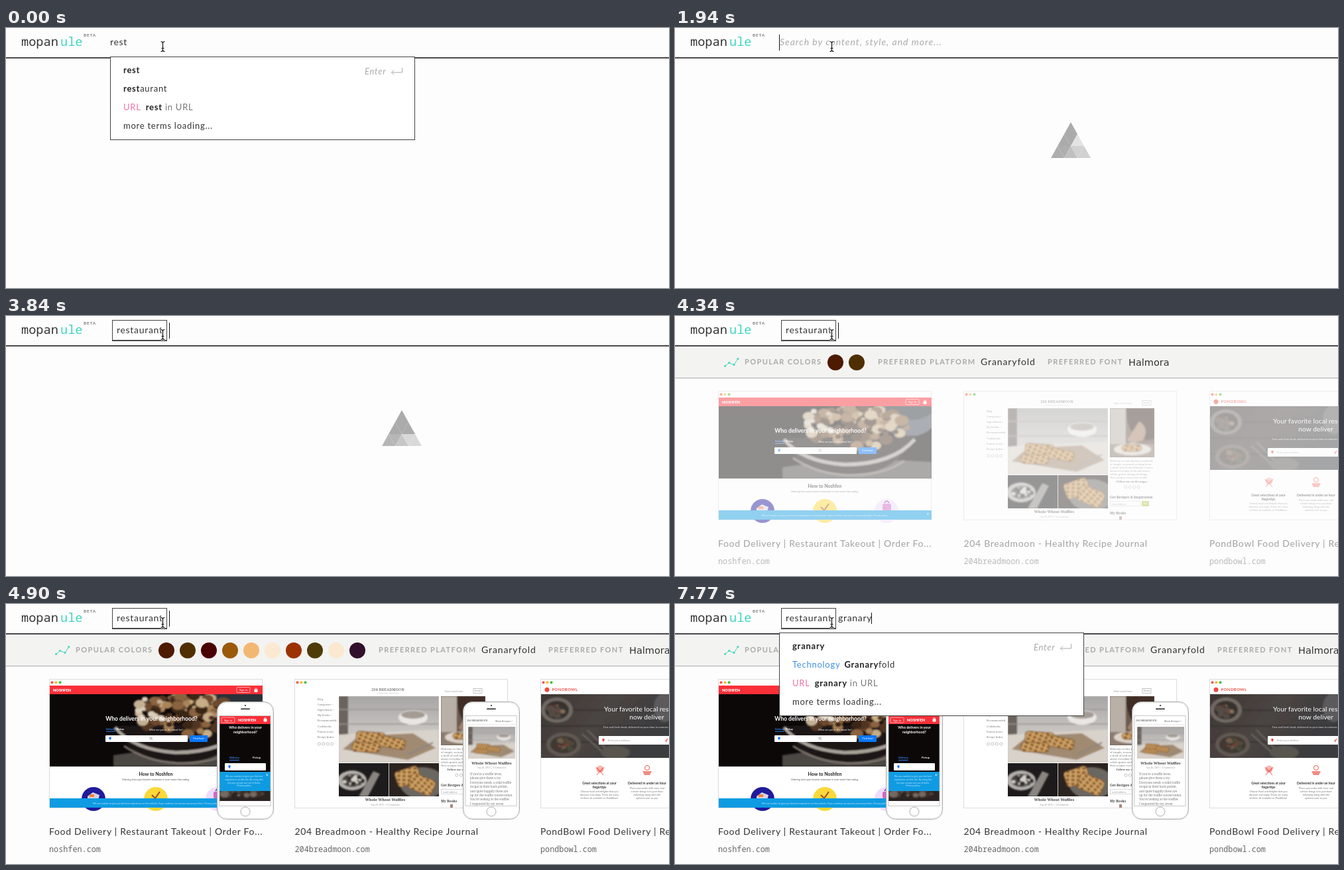
Recreate the animation shown at these times as an HTML page. Size 1000 by 392 pixels, loop 8000 ms.

```html
<!DOCTYPE html>
<html lang="en">
<head>
<meta charset="utf-8">
<title>Design search</title>
<style>
html, body { margin: 0; width: 100%; height: 100%; overflow: hidden; background: #fdfdfd; }
#stage { display: block; width: 1000px; height: 392px; }
</style>
</head>
<body>
<svg id="stage" viewBox="0 0 1000 392" font-family="Lato, sans-serif"></svg>
<script>
const LOOP = 8000;
const INK = '#333', GREY = '#aaa', TEAL = '#3fd6bf', PINK = '#f273a6', BLUE = '#3d8fe8';
const BRAND = 'Granaryfold', TYPED = 'granary';
const SERIF = 'font-family="Noto Serif, serif"';
const BOLD = 'font-weight="700"', MID = 'text-anchor="middle"';
const $ = id => document.getElementById(id);
const clamp = v => Math.max(0, Math.min(1, v));

// Drawing helpers
const rect = (x, y, w, h, fill, more = '') =>
  `<rect x="${x}" y="${y}" width="${w}" height="${h}" fill="${fill}" ${more}/>`;
const disc = (x, y, r, fill, more = '') => `<circle cx="${x}" cy="${y}" r="${r}" fill="${fill}" ${more}/>`;
const oval = (x, y, rx, ry, fill, more = '') =>
  `<ellipse cx="${x}" cy="${y}" rx="${rx}" ry="${ry}" fill="${fill}" ${more}/>`;
const shape = (d, fill, more = '') => `<path d="${d}" fill="${fill}" ${more}/>`;
const line = (d, color, w = 1, more = '') =>
  `<path d="${d}" fill="none" stroke="${color}" stroke-width="${w}" ${more}/>`;
const text = (x, y, size, fill, str, more = '') =>
  `<text x="${x}" y="${y}" font-size="${size}" fill="${fill}" ${more}>${str}</text>`;
const lines = (x, y, step, size, fill, list, more) =>
  list.map((s, i) => text(x, y + i * step, size, fill, s, more)).join('');
const group = (id, body, more = '') => `<g id="${id}" ${more}>${body}</g>`;
const photo = (x, y, w, h, base, body) =>
  `<svg x="${x}" y="${y}" width="${w}" height="${h}">${rect(0, 0, w, h, base)}<g filter="url(#soft)">${body}</g></svg>`;

let seed = 7;
const rnd = () => (seed = seed * 16807 % 2147483647) / 2147483647;
const blobs = (n, cx, cy, rx, ry, size, colors) => Array.from({ length: n }, () => {
  const a = rnd() * 6.283, d = Math.sqrt(rnd()), s = size * (0.4 + rnd());
  return oval((cx + rx * d * Math.cos(a)).toFixed(1), (cy + ry * d * Math.sin(a)).toFixed(1),
    (s * 1.3).toFixed(1), s.toFixed(1), colors[Math.floor(rnd() * colors.length)]);
}).join('');
const waffle = (x, y, w, h, angle) =>
  rect(x, y, w, h, 'url(#waffle)', `rx="5" stroke="#7d5426" transform="rotate(${angle} ${x + w / 2} ${y + h / 2})"`);

const defs = `<defs>
  <filter id="soft"><feGaussianBlur stdDeviation=".9"/></filter>
  <pattern id="waffle" width="8" height="6" patternUnits="userSpaceOnUse" patternTransform="rotate(20)">
    ${rect(0, 0, 8, 6, '#cfa468')}${rect(1, 1, 5, 3.5, '#8a5a2a')}</pattern>
  <linearGradient id="wall" x2="0" y2="1"><stop stop-color="#a7a5a4"/><stop offset=".5" stop-color="#c6c3c0"/><stop offset="1" stop-color="#d9d3cb"/></linearGradient>
  <linearGradient id="slate" x2="1" y2=".4"><stop stop-color="#3d3633"/><stop offset=".5" stop-color="#4b4542"/><stop offset="1" stop-color="#3b3c40"/></linearGradient>
</defs>`;

// Page header
const wordmark = (x, str, fill) =>
  text(x, 27, 18.6, fill, str, 'font-family="Noto Sans Mono, monospace" font-weight="500"');
const header = rect(0, 44, 1000, 2, '#4b484b') + wordmark(23, 'mopan', INK) + wordmark(82, 'ule', TEAL) +
  text(117, 13, 6.5, '#555', 'BETA', 'letter-spacing=".8"');

// Loader: nine small triangles, each lit in turn around the ring
const ringSlot = [0, 5, 5, 1, 4, 4, 3, 2, 2];
const triangles = () => {
  const out = [];
  for (let row = 0; row < 3; row++) {
    for (let k = 0; k <= row * 2; k++) {
      const x = 597 + (k - row) * 10, top = 142 + row * 18, low = top + 18;
      const d = k % 2 ? `M${x - 10} ${top}h20l-10 18z` : `M${x} ${top}L${x - 10} ${low}h20z`;
      out.push(shape(d, GREY, 'class="tri"'));
    }
  }
  return out.join('');
};

// Trend bar
const dotColors = ['#4e1a00', '#4f2f02', '#4a0000', '#9a5a0a', '#f2b873',
  '#fbe9d2', '#9c3303', '#4f3b08', '#fae8d0', '#33102b'];
const barLabel = (x, s) => text(x, 73, 11, GREY, s, BOLD + ' letter-spacing="1.38"');
const trend = [[75.5, 75.5], [81.5, 70.5], [89, 73.5], [94.8, 64.5]];
const bar = rect(0, 46, 1000, 47, '#f3f3f2') + rect(0, 93, 1000, 1, '#ababab') +
  line('M' + trend.join('L'), TEAL) + trend.map(([x, y]) => disc(x, y, 1.5, TEAL)).join('') +
  barLabel(105, 'POPULAR COLORS') +
  dotColors.map((c, i) => disc(242 + 32 * i, 70, 12, c, 'class="dot"')).join('') +
  group('prefs', barLabel(306, 'PREFERRED PLATFORM') + text(461, 74, 14, INK, BRAND, 'letter-spacing=".9"') +
    barLabel(562, 'PREFERRED FONT') + text(684, 75, 14.5, INK, 'Halmora', 'font-family="DejaVu Sans, sans-serif"'));

// Result cards
const frame = x => rect(x + .5, 113.5, 321, 194, '#fff', 'stroke="#dcdcdc"') +
  ['#f4574f', '#f5b92e', '#3fbf49'].map((c, i) => disc(x + 4.5 + i * 6, 118.3, 2, c)).join('');
const caption = (x, title, site) => text(x, 348, 14, INK, title, 'letter-spacing=".68"') +
  text(x, 374, 11.8, '#666', site, 'font-family="Noto Sans Mono, monospace"');
const phone = (x, screen) =>
  rect(x + .5, 147.5, 85, 177, '#fff', 'rx="14" stroke="#aaa"') +
  rect(x + 2, 149, 82, 174, 'none', 'rx="12.5" stroke="#ddd" stroke-width=".7"') +
  disc(x + 43, 153, 1.1, '#222') + rect(x + 36, 157.5, 14, 1.6, '#222', 'rx=".8"') +
  disc(x + 43, 313, 7, '#fff', 'stroke="#999" stroke-width=".8"') +
  screen + rect(x + 4, 168.5, 77, 136, 'none', 'stroke="#bbb" stroke-width=".8"');
const bag = (x, y) => rect(x - 2.5, y - 1.5, 5, 4.5, '#fff', 'rx="1"') +
  line(`M${x - 1.4} ${y - 1.5}a1.4 1.6 0 0 1 2.8 0`, '#fff', .8);
const signIn = (x, y) => rect(x, y, 20, 8, 'none', 'rx="1.5" stroke="#fff" stroke-width=".6"') +
  text(x + 10, y + 5.6, 4.2, '#fff', 'Sign in', MID);

const stew = shape('M96 92Q200 76 321 84V109H96z', '#4c4642') +
  oval(286, 16, 42, 30, '#48505c') + oval(286, 6, 36, 15, '#2c3138') +
  shape('M100 48Q120 100 190 104Q270 104 296 44z', '#1d1816') +
  blobs(120, 208, 32, 78, 30, 6, ['#4f3420', '#8a6440', '#a9835a', '#3a2618', '#c8ad86', '#6d4a2e']) +
  blobs(14, 150, 26, 26, 22, 5, ['#d9cdb8', '#c4b093']) +
  line('M98 50Q126 84 190 88Q262 88 296 50', '#aaa39c', 5) +
  line('M112 78Q150 104 200 104Q250 104 280 82', '#79716b', 3);
const tabs = (x, y, gap, s) => text(x, y, s, '#2f8cff', 'Delivery', BOLD) +
  text(x + gap, y, s, '#fff', 'Pickup', BOLD) + rect(x, y + 2, s * 3.7, .9, '#2f8cff');
const pin = (x, y, c) => disc(x, y, 1.8, c) + shape(`M${x - 1.6} ${y + .7}h3.2l-1.6 2.8z`, c);

const steps = disc(132, 294, 18, '#1f1b9c') + shape('M123 290l8-6 10 4-3 12h-15z', '#d9d2e0') + rect(126, 287, 7, 4, '#f2813d') +
  disc(226, 294, 18, '#fbd93a') + line('M220 288l5 5 7-10', '#a2472b', 2) +
  disc(319, 294, 18, '#efdcfb') + rect(313, 283, 13, 10, '#cf6ac2', 'rx="2"') + line('M316 282q3-6 7 0', '#7a3b9d', 1.5);

const noshCard = frame(65) + rect(66, 123, 321, 13, '#fa2f38') +
  text(71, 131.8, 5.6, '#fff', 'NOSHFEN', 'font-weight="900"') + signIn(348, 125.5) + bag(377, 130) +
  photo(66, 136, 321, 109, '#0d0808', stew) +
  text(219.5, 175.5, 8.6, '#fff', 'Who delivers in your neighborhood?', BOLD + ' ' + MID) +
  tabs(151, 189.7, 16, 3.6) + text(216, 190.5, 3.8, '#fff', 'What are you in the mood for?') +
  rect(150, 198, 124, 10, '#fff', 'rx="1"') + pin(157, 202, '#1a7cff') +
  disc(218.5, 202.3, 1.5, 'none', 'stroke="#777" stroke-width=".7"') + line('M219.6 203.5l1.6 1.6', '#777', .7) +
  rect(277, 198, 27, 10, '#0a77fb', 'rx="1"') + text(290.5, 204.4, 3.8, '#fff', 'Find food', MID) +
  text(226, 258.5, 7, '#222', 'How to Noshfen', BOLD + ' ' + MID) +
  text(226, 266, 3.6, '#555', 'Ordering from your favorite restaurant is even easier than eating.', MID) +
  steps + rect(66, 293, 321, 14, '#0f9be2') +
  text(226, 301.5, 3.5, '#bfe6fb', 'We use cookies to give you the best experience on this website. If you continue, we assume you accept them. Privacy policy.', MID) +
  line('M380 297l3 3m0-3l-3 3', '#fff', .7) +
  caption(65, 'Food Delivery | Restaurant Takeout | Order Fo...', 'noshfen.com');

const noshPhone = phone(318, rect(322, 169, 77, 12, '#fa2f38') + signIn(325, 171) +
  text(350, 177.3, 5.6, '#fff', 'NOSHFEN', 'font-weight="900"') + bag(391, 174.5) +
  rect(322, 181, 77, 72, '#0d0808') +
  photo(322, 282, 77, 15, '#2a2321', blobs(24, 36, 3, 32, 7, 4, ['#544a45', '#75685f', '#3d2e28'])) +
  lines(361, 187.5, 7, 5.4, '#fff', ['Who delivers in your', 'neighborhood?'], BOLD + ' ' + MID) +
  tabs(337, 233, 35, 4) + rect(330, 240, 62, 11, '#fff', 'rx="1"') + pin(337, 244.7, '#1a7cff') +
  rect(322, 253, 77, 29, '#0f9be2') + line('M392 256l3.4 3.4m0-3.4l-3.4 3.4', '#fff', .7) +
  lines(359, 261, 4.8, 3.6, '#bfe6fb', ['We use cookies to give you the best', 'experience on this site. By using this',
    'site you accept our use of them.', 'Privacy policy'], MID));

const breakfast = rect(0, 0, 151, 100, 'url(#wall)') + rect(0, 0, 14, 60, '#6b625d') +
  line('M0 20H151M0 42H151', '#989594', 1.5) + oval(112, 32, 22, 11, '#e9e7e4') + oval(112, 28, 18, 6, '#a49c94') +
  shape('M0 58L151 50V100H0z', '#d8d2ca') + shape('M6 80L30 60L112 56L146 78L104 96z', '#a08a72') +
  waffle(26, 54, 44, 18, 4) + waffle(58, 62, 42, 16, 10) + waffle(20, 70, 42, 14, 2) +
  line('M104 88L142 70', '#8d8680', 2);
const kitchen = rect(0, 0, 24, 74, '#b9b0a7') + shape('M24 0H67V46Q48 52 36 40Q24 24 24 0z', '#3f2d25') +
  shape('M44 20Q60 30 50 48L34 54L26 48z', '#a5826b') +
  rect(0, 54, 67, 20, '#8c7d70') + oval(34, 62, 28, 9, '#dcd4ca') + waffle(18, 55, 30, 10, 0);
const berries = oval(20, 26, 22, 15, '#b3afaa') + oval(20, 26, 15, 10, '#4b4644') +
  shape('M30 50L52 12L62 16L44 50z', '#8a8580') + blobs(22, 22, 26, 14, 9, 2.6, ['#4b4644', '#9c958e', '#d6d1ca', '#2e2a29']);
const stack = oval(50, 30, 34, 24, '#6b6661') + waffle(10, 8, 36, 24, -18) + waffle(30, 20, 38, 24, 22);

const social = (x, y, gap) => [0, 1, 2, 3].map(i =>
  disc(x + i * gap, y, 2.1, 'none', 'stroke="#aaa" stroke-width=".7"')).join('');
const breadCard = frame(435) +
  text(576, 131, 5.4, '#444', '204 BREADMOON', `${SERIF} ${MID} letter-spacing=".3"`) +
  text(576, 134.5, 2.6, '#999', 'a natural foods recipe journal', MID) +
  text(662, 132.5, 3.6, '#999', 'Enter search here') +
  rect(705, 127.5, 13, 7, 'none', 'stroke="#aaa" stroke-width=".7"') + text(711.5, 132.3, 3.2, '#888', 'Search', MID) +
  lines(470, 144.5, 8.2, 4, '#777', ['Blog', 'Categories +', 'Ingredients +', 'My Books +', 'Recommended', 'Cookbooks',
    'Pantry notes', 'Recipe Index'], SERIF) + social(472.5, 211, 6.4) +
  photo(502, 139, 151, 100, '#c9c5c0', breakfast) + photo(656, 139, 67, 74, '#6a5a50', kitchen) +
  photo(502, 240, 75.5, 50, '#1d1b1b', berries) + photo(578, 240, 75, 50, '#2b2320', stack) +
  lines(656, 220, 5, 4, '#777', ['Welcome to this kitchen notebook', 'of simple, seasonal cooking from', 'a shelf of well loved books. I write',
    'about everyday food and travel,', 'whole grains and good things.', 'New recipes every few weeks.'], SERIF) +
  text(689, 251, 4, '#555', 'Follow me on the pages', `${SERIF} ${MID} ${BOLD}`) + social(680, 258, 6.4) +
  text(656, 275, 5, '#444', 'Get Recipes &amp; Inspiration', SERIF + ' ' + BOLD) +
  rect(656.5, 279.5, 45, 7, '#fff', 'stroke="#ccc" stroke-width=".7"') + text(659, 284.5, 3.6, '#999', 'email address') +
  rect(704, 279, 11, 8, '#b6c955') + text(709.5, 284.3, 3.5, '#fff', 'GO', MID) +
  text(656, 298.5, 5, '#444', 'My Books', SERIF + ' ' + BOLD) + rect(670, 302, 4, 5, '#a9877a') +
  text(572, 297, 5.6, '#444', 'Whole Wheat Waffles', `${SERIF} ${MID} ${BOLD}`) +
  text(572, 303.5, 3.4, '#999', 'Sep 20, 2015 | 3 Comments', `${SERIF} ${MID}`) +
  caption(435.5, '204 Breadmoon - Healthy Recipe Journal', '204breadmoon.com');

const breadPhone = phone(689, text(695, 177, 3.7, '#444', '204 BREADMOON', SERIF) +
  text(738, 177.5, 3.7, '#666', 'Main Recipes +', SERIF) + rect(695, 181, 73, .6, '#ddd') +
  photo(697, 185, 71, 48, '#c9c5c0', `<g transform="scale(.48)">${breakfast}</g>`) +
  text(732.5, 241.5, 5.6, '#444', 'Whole Wheat Waffles', `${SERIF} ${MID} ${BOLD}`) +
  text(732.5, 247.5, 3.4, '#999', 'Sep 20, 2015 | 3 Comments', `${SERIF} ${MID}`) +
  lines(700, 258, 6.4, 4.4, '#777', ['If you\'re a waffle lover,', 'please give these a try.', 'Everyone needs a solid waffle', 'recipe in their back pocket,',
    'and quite happily these are', 'up for the waffle conversation.', 'You\'re looking at the waffles', 'I requested by my seven'], SERIF));

const tabletop = rect(0, 0, 193, 96, 'url(#slate)') +
  line('M0 24H193M0 48H193M0 72H193', '#332d2b', 1.5) +
  oval(24, 24, 24, 19, '#6f6964') + oval(24, 24, 18, 14, '#37302d') + blobs(16, 24, 24, 13, 9, 3, ['#6b4a3c', '#85705a', '#544b45']) +
  oval(34, 76, 26, 18, '#605852') + oval(34, 76, 20, 13, '#3f3833') + blobs(16, 34, 76, 15, 9, 3, ['#6e5b49', '#724034', '#4a4c3c']) +
  line('M62 60l34 30M70 54l34 34', '#77706a', 1.5) + oval(112, 88, 22, 10, '#595450') + oval(186, 20, 16, 22, '#5b5a5c');
const bowlCard = frame(806) + disc(816, 129.3, 3.5, '#ee4b3e') +
  text(823.5, 131.3, 6, '#ee4b3e', 'PONDBOWL', BOLD + ' letter-spacing=".4"') +
  photo(807, 136, 193, 96, '#433d3a', tabletop) +
  text(902, 162, 10.3, '#fff', 'Your favorite local restaurants') + text(966.5, 173.5, 10.3, '#fff', 'now deliver', MID) +
  text(901, 186.5, 4.2, '#ddd', 'Fast and fresh food, delivered to your door in minutes') +
  rect(894, 199, 150, 13, '#fff', 'rx="1"') + pin(901, 204.5, '#ee4b3e') +
  text(908, 207, 4, '#999', 'Enter your address') + line('M994 207l4-4M998 203l-2 5-1-2z', '#ee4b3e', .8) +
  disc(896, 249, 5.5, '#f7b9b4') + line('M890 246q6 13 12 0M891 258l9-11M901 258l-9-11', '#ee5a4e', 1) +
  disc(967, 247, 3.5, 'none', 'stroke="#ee5a4e"') + shape('M960 252h14l-3 6h-8z', '#f18d85') +
  lines(895, 271.5, 6.5, 4.9, '#333', ['Great selections at your', 'fingertips'], BOLD + ' ' + MID) +
  text(967, 271.5, 4.9, '#333', 'Delivered in under an hour', BOLD + ' ' + MID) +
  lines(895, 284, 5.2, 3.8, '#777', ['Choose food and delights that you', 'discover and enjoy. There are many', 'of them all available on PondBowl.'], MID) +
  lines(967, 278.5, 5.2, 3.8, '#777', ['Place your order with ease, and', 'a driver brings it to your door,', 'following along with the', 'updates sent to you.'], MID) +
  caption(806, 'PondBowl Food Delivery | Restaurant Delivery', 'pondbowl.com');

// Search field
const field = text(158, 26, 14, GREY, 'Search by content, style, and more...', 'id="hint" font-style="italic" letter-spacing=".98"') +
  group('tag', rect(160.5, 6.5, 82, 31, '#fff', 'stroke="#444"') + rect(160, 36, 83, 2, '#444') +
    text(167, 26, 14, INK, 'restaurant', 'letter-spacing=".7"')) +
  text(157, 26, 14, INK, '', 'id="query" letter-spacing=".7"') + rect(157, 10, 1, 24, '#111', 'id="caret"');
const beam = 'M233.5 20.5q3 0 3 2.5q0-2.5 3-2.5M236.5 22.5v11.5M233.5 35.5q3 0 3-2.5q0 2.5 3 2.5M234.5 30.5h4';
const pointer = line(beam, '#fff', 3) + line(beam, '#111', 1.2);

$('stage').innerHTML = defs + rect(0, 0, 1000, 392, '#fdfdfd') + header + group('loader', triangles()) +
  group('results', bar + group('cards', noshCard + breadCard + bowlCard) + group('phones', noshPhone + breadPhone)) +
  field + group('drop', '', 'letter-spacing=".75"') + pointer;

// Suggestion list
const bold = (s, dx = 0) => `<tspan ${BOLD} fill="#222" dx="${dx}">${s}</tspan>`;
const starts = (q, word, dx) => bold(word.slice(0, q.length), dx) + word.slice(q.length);
const kind = (name, color) => `<tspan fill="${color}">${name}</tspan>`;
const inUrl = q => kind('URL', PINK) + bold(q, 7) + ' <tspan fill="#777">in URL</tspan>';
const LOADING = 'more terms loading...';
const moreWords = {
  rest: ['restore', 'resting', 'restful', 'restart', 'restyle', 'restroom', 'restless'],
  g: ['gallery', 'garden', 'gift', 'glass', 'green', 'grid', 'grocery', 'group', 'guide', 'guitar', 'gym']
};
function suggestions(q, full) {
  if (full) return [bold(q), ...(q === 'rest' ? [starts(q, 'restaurant')] : []), inUrl(q), ...moreWords[q].map(w => starts(q, w))];
  const second = q === 'rest' ? starts(q, 'restaurant') : kind('Technology', BLUE) + starts(q, BRAND, 6);
  return [bold(q), second, inUrl(q), LOADING];
}
let shown = null;
function showList(q, full, active) {
  const key = [q, full, active].join();
  if (key === shown) return;
  shown = key;
  if (!q) { $('drop').innerHTML = ''; return; }
  const rows = suggestions(q, full), at = Math.max(0, active), y = 50 + at * 28;
  $('drop').innerHTML = rect(157.5, 43.5, 459, rows.length * 28 + 13, '#fff', 'stroke="#444"') +
    (active >= 0 ? rect(158, y, 458, 28, '#f1f1f1') : '') +
    rows.map((r, i) => text(177, 68 + i * 28, 13, INK, r)).join('') +
    text(541, y + 20, 13, GREY, 'Enter', 'font-style="italic"') +
    line(`M597.5 ${y + 10}v7h-16m3.5-3.5l-3.5 3.5l3.5 3.5`, GREY);
}

// Timeline
const keyTimes = [6690, 6810, 6990, 7100, 7250, 7400, 7600];
const listTimes = [[6900, 1], [7040, 2], [7170, 4], [7330, 5], [7480, 6], [7770, 7]];
const caretSpans = [[480, 1520], [1940, 2680], [3200, 5380], [5920, 6390], [6690, LOOP]];
const show = (el, on) => { el.style.display = on ? '' : 'none'; };
const tris = document.querySelectorAll('.tri'), dots = document.querySelectorAll('.dot');

function drawLoader(t) {
  const turn = (t - 1940) / 164 + 0.4;
  tris.forEach((tri, i) => {
    const age = (turn + ringSlot[i] + 5) % 6;
    const v = Math.round(171 + Math.max(0, 63 - 17.5 * age));
    tri.setAttribute('fill', `rgb(${v},${v},${v})`);
  });
}
function drawResults(t) {
  const s = 4340 + Math.floor((t - 4340) / 90) * 90;
  const n = Math.max(0, Math.min(10, Math.floor(2 + (s - 4340) * 8 / 540)));
  dots.forEach((d, i) => show(d, i < n));
  $('prefs').setAttribute('transform', `translate(${(n - 2) * 32} 0)`);
  $('cards').setAttribute('opacity', clamp((s - 4060) / 620));
  $('phones').setAttribute('opacity', clamp((s - 4520) / 270));
}
function drawField(t) {
  const tagged = t >= 2150, query = t < 1940 ? 'rest' : TYPED.slice(0, keyTimes.filter(k => t >= k).length);
  const left = tagged ? 246 : 157, el = $('query');
  show($('hint'), t >= 1940 && !tagged);
  show($('tag'), tagged);
  if (el.textContent !== query) el.textContent = query;
  el.setAttribute('x', left);
  const caret = $('caret');
  caret.setAttribute('x', left + (query ? Math.floor(el.getComputedTextLength() - 0.7) : 0));
  caret.setAttribute('y', query ? 13 : 10);
  caret.setAttribute('height', query ? 17 : 24);
  show(caret, caretSpans.some(([a, b]) => t >= a && t < b));
}
function drawList(t) {
  if (t < 1940) return showList('rest', t >= 930, t < 1050 ? -1 : t < 1280 ? 0 : 1);
  const n = listTimes.reduce((last, [at, count]) => t >= at ? count : last, 0);
  showList(TYPED.slice(0, n), n === 1, -1);
}
function render(t) {
  const waiting = t >= 1940 && t < 3960;
  show($('loader'), waiting);
  show($('results'), t >= 3960);
  if (waiting) drawLoader(t);
  if (t >= 3960) drawResults(t);
  drawField(t);
  drawList(t);
}
const start = performance.now();
function tick() {
  render((performance.now() - start) % LOOP);
  requestAnimationFrame(tick);
}
tick();
</script>
</body>
</html>
```
